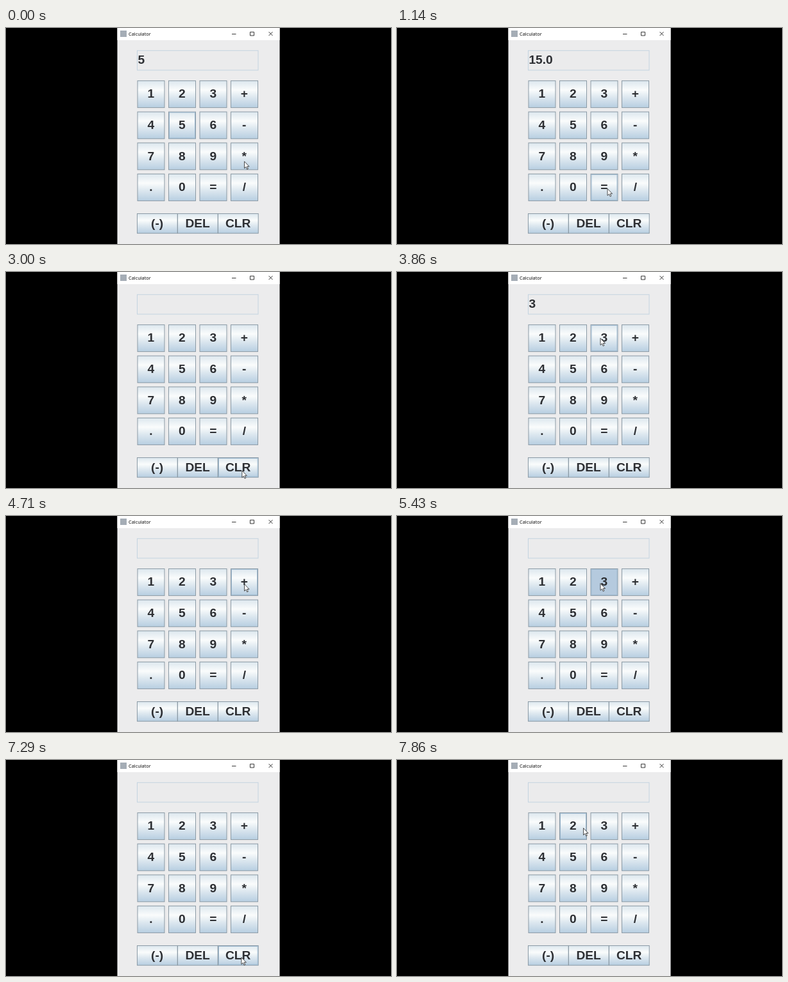
An HTML page that plays this animation: 600 by 338 pixels, repeating every 8000 ms.

```html
<!DOCTYPE html>
<html lang="en">
<head>
<meta charset="utf-8">
<title>Calculator</title>
<style>
  html, body { margin: 0; width: 100%; height: 100%; overflow: hidden; background: #000; }
  svg { display: block; width: 100vw; height: 100vh; }
  .label { font: bold 19.2px "Liberation Sans", Arial, sans-serif; fill: #2d2f33; }
  .key text { text-anchor: middle; }
  .face { fill: url(#metal); stroke: #8b9aa5; }
  .ring { fill: none; stroke: #9cb8cf; visibility: hidden; }
  .hover .ring { visibility: visible; }
  .down .face { fill: #b5cade; }
</style>
</head>
<body>
<svg viewBox="0 0 600 338">
  <defs>
    <linearGradient id="metal" x2="0" y2="1">
      <stop offset="0" stop-color="#dce7ee"/>
      <stop offset=".34" stop-color="#fafcfc"/>
      <stop offset=".62" stop-color="#dce7ef"/>
      <stop offset="1" stop-color="#b7cee1"/>
    </linearGradient>
  </defs>
  <rect width="600" height="338"/>
  <rect x="173.5" width="253" height="338" fill="#ececed"/>
  <rect x="173.5" width="253" height="19" fill="#fff"/>
  <rect x="178" y="4" width="10" height="10" fill="#a5adb6"/>
  <text x="191" y="11.6" font-family="'Open Sans', sans-serif" font-size="7.4">Calculator</text>
  <path d="M352 9.5h6.5M380.5 6.3h6v5.6h-6zM409.5 6l6 6M415.5 6l-6 6" fill="none" stroke="#222" stroke-width=".9"/>
  <rect x="204.5" y="35.3" width="188.5" height="30.7" fill="#ebebec" stroke="#c3d4e0"/>
  <text id="display" class="label" x="205.4" y="56.2"></text>
  <g id="keys"></g>
  <path id="cursor" d="M0 0V10.8L2.5 8.5L4.2 12.3L5.9 11.5L4.2 7.9H7.5Z" fill="#fff" stroke="#222" stroke-width=".8"/>
</svg>
<script>
const LOOP = 8000, STEPS = 56, GLIDE = 3;
const NS = "http://www.w3.org/2000/svg";
const display = document.getElementById("display");
const cursor = document.getElementById("cursor");
const board = document.getElementById("keys");

// Each visit: the key, the step the pointer arrives, and its offset from the key's centre.
// A key is pressed one step after arrival and released after two.
const visit = (label, at, dx, dy) => ({ label, at, dx, dy });
const visits = [
  visit("5", -2, 8, 8), visit("*", 0, 0, 8), visit("3", 3, -5, 1), visit("=", 6, 5, 2),
  visit("CLR", 16, 6, 5), visit("3", 25, -6, 0), visit("+", 30, 0, 3), visit("3", 37, -6, 2),
  visit("=", 41, 10, 6), visit("CLR", 49, 5, 3), visit("2", 54, 16, 3)
];
const clicks = visits.slice(0, -1);

const maths = {
  "+": (a, b) => a + b,
  "-": (a, b) => a - b,
  "*": (a, b) => a * b,
  "/": (a, b) => a / b
};

function add(parent, tag, attrs) {
  const el = document.createElementNS(NS, tag);
  for (const name in attrs) el.setAttribute(name, attrs[name]);
  return parent.appendChild(el);
}

const keys = {};
function makeKey(label, x, y, width, height) {
  const el = add(board, "g", { class: "key" });
  const cx = x + width / 2, cy = y + height / 2;
  add(el, "rect", { class: "face", x, y, width, height });
  add(el, "rect", { class: "ring", x: x + 1, y: y + 1, width: width - 2, height: height - 2 });
  add(el, "text", { class: "label", x: cx - .2, y: cy + 5.8 }).textContent = label;
  keys[label] = { el, cx, cy };
}

[..."123+456-789*.0=/"].forEach((label, i) =>
  makeKey(label, 205 + (i % 4) * 48.5, 82.6 + Math.floor(i / 4) * 48.6, 42, 42));
["(-)", "DEL", "CLR"].forEach((label, i) =>
  makeKey(label, 204.5 + i * 63, 290.5, 62.7, 30.7));

const aim = v => ({ x: keys[v.label].cx + v.dx, y: keys[v.label].cy + v.dy });

function pointerAt(step) {
  const next = Math.max(1, visits.findIndex(v => v.at >= step));
  const i = step > visits.at(-1).at ? visits.length - 1 : next;
  const from = visits[i - 1], to = visits[i];
  const leave = Math.max(from.at + 1, to.at - GLIDE);
  const k = Math.min(1, Math.max(0, (step - leave) / (to.at - leave)));
  const e = k * k * (3 - 2 * k), a = aim(from), b = aim(to);
  return { x: a.x + (b.x - a.x) * e, y: a.y + (b.y - a.y) * e };
}

// Replay the released keys to find what the display shows
function valueAt(step) {
  let shown = "", first, op;
  for (const { label, at } of clicks) {
    if (at + 2 > step) break;
    if (label === "CLR") shown = "";
    else if (label === "=") shown = maths[op](first, +shown).toFixed(1);
    else if (maths[label]) [first, op, shown] = [+shown, label, ""];
    else shown += label;
  }
  return shown;
}

function draw(ms) {
  const step = Math.floor((ms + 5) * STEPS / LOOP) % STEPS;
  const hovered = visits.filter(v => v.at < step).pop().label;
  const pressed = clicks.find(v => v.at + 1 === step)?.label;
  for (const label in keys) {
    const { classList } = keys[label].el;
    classList.toggle("hover", label === hovered);
    classList.toggle("down", label === pressed);
  }
  const { x, y } = pointerAt(step);
  cursor.setAttribute("transform", `translate(${x} ${y})`);
  display.textContent = valueAt(step);
}

const start = performance.now();
function tick() {
  draw((performance.now() - start) % LOOP);
  requestAnimationFrame(tick);
}
tick();
</script>
</body>
</html>
```
